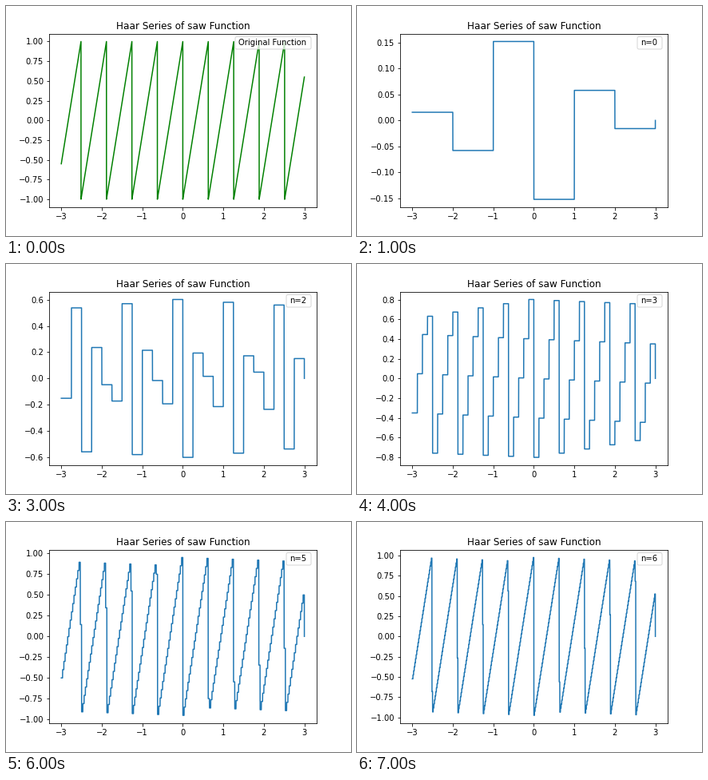
These frames come from a looping animation (432 by 288 pixels, 8000 ms). A matplotlib script:

```python
import numpy as np
import matplotlib.pyplot as plt
from matplotlib.animation import FuncAnimation
from matplotlib.patches import FancyBboxPatch
from matplotlib.transforms import Affine2D

W, H, DPI = 432, 288, 72
PERIOD = 2 * np.pi / 10
X = np.linspace(-3, 3, 10000)

plt.rcParams["font.family"] = "DejaVu Sans"
fig, ax = plt.subplots(figsize=(W / DPI, H / DPI), dpi=DPI)
fig.subplots_adjust(left=0.125, right=0.9, bottom=0.125, top=0.88)
pixels = Affine2D().scale(1 / W, 1 / H) + fig.transFigure


def saw(x):
    return 2 * (x / PERIOD % 1) - 1


def saw_integral(x):
    phase = x / PERIOD % 1
    return PERIOD * (phase**2 - phase)


def haar(x, n):
    """Mean of the saw wave on dyadic cells of width 2**-n inside [-3, 3)."""
    width = 2.0**-n
    left = np.floor(x / width) * width
    mean = (saw_integral(left + width) - saw_integral(left)) / width
    return np.where(x < 3, mean, 0)


def draw_label(label, width):
    right, bottom, height = 382, 234, 15.5
    ax.add_patch(FancyBboxPatch(
        (right - width, bottom), width, height,
        boxstyle="round,pad=0,rounding_size=2", transform=pixels,
        fc="white", ec="0.8", lw=1, alpha=0.8, zorder=5))
    ax.text(right - 5.6, bottom + 5, label, transform=pixels, size=10,
            ha="right", va="baseline", zorder=6)


def draw(i):
    ax.clear()
    if i == 0:
        ax.plot(X, saw(X), color="green")
        draw_label("Original Function", 95)
    else:
        ax.plot(X, haar(X, i - 1), color="tab:blue")
        draw_label(f"n={i - 1}", 31)
    ax.set_title("Haar Series of saw Function")
    return []


anim = FuncAnimation(fig, draw, frames=8, interval=1000, repeat=True,
                     repeat_delay=0, blit=False)
plt.show()
```
